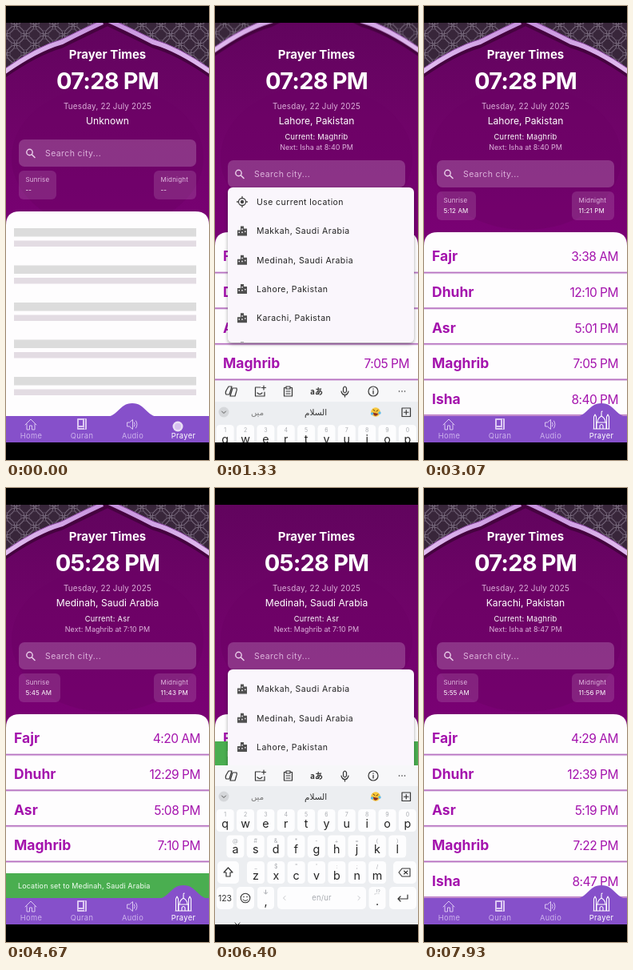
An HTML page for the animation above (8 s loop, 254x568 px).

```html
<!DOCTYPE html>
<html lang="en">
<head>
<meta charset="utf-8">
<title>Prayer Times</title>
<style>
html, body { margin: 0; width: 100%; height: 100%; overflow: hidden; background: #000; }
svg { display: block; width: 100%; height: 100%; }
text { font-family: Poppins, Inter, sans-serif; white-space: pre; }
.mid { text-anchor: middle; }
.end { text-anchor: end; }
.bold { font-weight: 700; }
.arab { font-family: "Noto Sans", "DejaVu Sans", sans-serif; }
.cjk { font-family: "Noto Sans CJK JP", "Noto Sans CJK", sans-serif; font-weight: 700; }
.line { fill: none; stroke-linecap: round; stroke-linejoin: round; }
</style>
</head>
<body>
<svg id="stage" viewBox="0 0 254 568"></svg>
<script>
const LOOP = 8000;
const text = (x, y, size, fill, str, cls = '', gap = 0) =>
  `<text x="${x}" y="${y}" font-size="${size}" fill="${fill}" class="${cls}" letter-spacing="${gap}">${str}</text>`;
const rect = (x, y, w, h, fill, r = 0) =>
  `<rect x="${x}" y="${y}" width="${w}" height="${h}" rx="${r}" fill="${fill}"/>`;
const line = (d, color, width = 1) =>
  `<path class="line" d="${d}" stroke="${color}" stroke-width="${width}"/>`;
const group = (id, body, attrs = '') => `<g id="${id}" ${attrs}>${body}</g>`;
const move = (x, y, body) => `<g transform="translate(${x} ${y})">${body}</g>`;
const ring = (x, y, r, color, width = 1) =>
  `<circle cx="${x}" cy="${y}" r="${r}" fill="none" stroke="${color}" stroke-width="${width}"/>`;
const dot = (x, y, r, fill) => `<circle cx="${x}" cy="${y}" r="${r}" fill="${fill}"/>`;

const PRAYERS = ['Fajr', 'Dhuhr', 'Asr', 'Maghrib', 'Isha'];
const PLACES = {
  lahore: {
    clock: '07:28 PM', city: 'Lahore, Pakistan', now: 'Maghrib', next: 'Isha at 8:40 PM',
    sunrise: '5:12 AM', midnight: '11:21 PM', boxWidth: 49,
    times: ['3:38 AM', '12:10 PM', '5:01 PM', '7:05 PM', '8:40 PM']
  },
  medinah: {
    clock: '05:28 PM', city: 'Medinah, Saudi Arabia', now: 'Asr', next: 'Maghrib at 7:10 PM',
    sunrise: '5:45 AM', midnight: '11:43 PM', boxWidth: 52,
    times: ['4:20 AM', '12:29 PM', '5:08 PM', '7:10 PM', '8:40 PM']
  },
  karachi: {
    clock: '07:28 PM', city: 'Karachi, Pakistan', now: 'Maghrib', next: 'Isha at 8:47 PM',
    sunrise: '5:55 AM', midnight: '11:56 PM', boxWidth: 52,
    times: ['4:29 AM', '12:39 PM', '5:19 PM', '7:22 PM', '8:47 PM']
  }
};

const defs = `<defs>
  <linearGradient id="wall" x1="0" y1="0" x2="0" y2="1">
    <stop offset="0" stop-color="#5f045c"/><stop offset=".45" stop-color="#6f0368"/><stop offset="1" stop-color="#7d0078"/>
  </linearGradient>
  <linearGradient id="band" x1="0" y1="0" x2="1" y2="0">
    <stop offset="0" stop-color="#e2bdf0"/><stop offset="1" stop-color="#c48fdc"/>
  </linearGradient>
  <pattern id="lattice" width="24" height="24" patternUnits="userSpaceOnUse">
    ${rect(0, 0, 24, 24, '#38263a')}
    ${[[0, 0], [24, 0], [0, 24], [24, 24], [12, 12]].map(([x, y]) =>
      ring(x, y, 11, '#85778a', .8) + ring(x, y, 7, '#66566b', .7)).join('')}
  </pattern>
  <clipPath id="menuClip"><rect x="16" y="227" width="233" height="194" rx="6"/></clipPath>
  <filter id="soft" x="-10%" y="-10%" width="120%" height="125%">
    <feDropShadow dx="0" dy="2" stdDeviation="2" flood-opacity=".35"/>
  </filter>
</defs>`;

const archHalf = `
  <path d="M0 0H127V19Q101 31 70 46Q38 55 0 82Z" fill="url(#lattice)"/>
  ${line('M130 21Q101 35 70 50Q38 59 -3 88', '#45033f', 5)}
  ${line('M130 16Q101 29 70 45Q38 54 -3 83', 'url(#band)', 6)}
  ${line('M130 13Q101 26 70 41.500Q38 50.500 -3 79.500', '#8c46a3', 1)}`;
const arch = archHalf + `<g transform="matrix(-1 0 0 1 254 0)">${archHalf}</g>`;

function infoBoxes(width, sunrise, midnight) {
  const box = (x, w, label, value) => rect(x, 232, w, 36, '#fff2', 6) +
    text(x + 8.5, 246, 8, '#e0b9df', label, '', .2) + text(x + 8.5, 259, 8, '#fff', value, '', .1);
  return box(16, width, 'Sunrise', sunrise) + box(185, 53, 'Midnight', midnight);
}

const place = (id, p) => group(id,
  text(127, 104, 29, '#fff', p.clock, 'mid bold', -.8) +
  text(127, 147.500, 12.1, '#fff', p.city, 'mid') +
  text(127, 167, 9.3, '#fff', 'Current: ' + p.now, 'mid', .25) +
  text(127, 180, 9, '#dfb5dd', 'Next: ' + p.next, 'mid') +
  infoBoxes(p.boxWidth, p.sunrise, p.midnight) +
  PRAYERS.map((name, i) => {
    const y = 319.300 + i * 44.600;
    return text(10, y, 17.500, '#a413ad', name, 'bold') +
      text(243, y, 15.500, '#a413ad', p.times[i], 'end', -.5) +
      rect(0, y + 13, 254, 3, '#e6d3ea') + rect(0, y + 13.500, 254, 1.500, '#b873c2');
  }).join(''));

const skeleton = group('loading',
  text(127, 104, 29, '#fff', '07:28 PM', 'mid bold', -.8) +
  text(127, 147.500, 12.1, '#fff', 'Unknown', 'mid') +
  move(0, -26, infoBoxes(47, '--', '--')) +
  [0, 1, 2, 3, 4].map(i => rect(10, 278 + i * 46.500, 228, 10.500, '#dcdcdc') +
    rect(10, 293.500 + i * 46.500, 228, 7.500, '#e3dce3')).join(''));

const search = rect(16, 193, 222, 34, '#fff3', 7) + ring(29.500, 209, 3.700, '#ead0ea', 1.400) +
  line('M32.500 212L36 215.500', '#ead0ea', 1.600) +
  text(49, 214.300, 10.500, '#dcb2db', 'Search city...', '', .4);

const targetIcon = ring(34, 245, 4.500, '#444', 1.300) + dot(34, 245, 2.200, '#444') +
  line('M34 238.500V240M34 250V251.500M27.500 245H29M39 245H40.500', '#444', 1.300);
const cityIcon = `<path fill="#505050" fill-rule="evenodd" d="M28 -1H32V-6H36V-3H40V6H28Z
  M29.500 1V2.500H31V1ZM33.200 -3V-1.500H34.800V-3ZM33.200 1V2.500H34.800V1ZM37 0V1.500H38.500V0Z"/>`;
const cities = ['Makkah, Saudi Arabia', 'Medinah, Saudi Arabia', 'Lahore, Pakistan',
  'Karachi, Pakistan', 'Islamabad, Pakistan'];
const menu = group('menu',
  `<g filter="url(#soft)">${rect(16, 227, 233, 194, '#faf6fc', 6)}</g>
  <g clip-path="url(#menuClip)">${group('menuRows', targetIcon +
    text(52, 249, 10.500, '#222', 'Use current location', '', .42) +
    cities.map((name, i) => move(0, 281.500 + i * 36.250, cityIcon +
      text(52, 3.800, 10.500, '#222', name, '', .45))).join(''))}</g>`);

const snack = group('snack', rect(0, 482, 254, 31, '#4aae50') +
  text(15, 501, 9, '#f4fff4', 'Location set to Medinah, Saudi Arabia', '', .12));

const pale = '#dcc8f2';
const homeIcon = line('M24 524L31 517L38 524M26 523V530H29.500V525H32.500V530H36V523', pale);
const bookIcon = rect(89, 516, 12, 14, pale, 1) + rect(91, 518, 5, 7, '#8650ca') +
  line('M98.500 517V529M91 527.500H97', '#8650ca');
const audioIcon = line('M152 521H154.500L158.500 517.500V529.500L154.500 526H152ZM160.500 521Q162 523.500 160.500 526M162.500 519Q165.500 523.500 162.500 528', pale);
const mosque = line(`M212 529H232M216 529V521H228V529M217 521Q217 516 222 513Q227 516 227 521M222 513V509
  M212.500 529V514L214 511L215.500 514V529M228.500 529V514L230 511L231.500 514V529M220 529V525Q222 522 224 525V529
  M222 508L223 507`, '#fff', 1.100);
const nav = rect(0, 513, 254, 34, '#8650ca') +
  group('bump', '<path d="M-34 514C-17 514 -17 497 0 497S17 514 34 514Z" fill="#8650ca"/>') +
  homeIcon + bookIcon + audioIcon + group('mosque', mosque) +
  group('touch', dot(215, 526, 6.500, '#e9dff5') + dot(215, 526, 4, '#d6c0ee')) +
  ['Home', 'Quran', 'Audio', 'Prayer'].map((name, i) =>
    text(31.500 + i * 63.500, 541, 9.300, i === 3 ? '#fff' : '#cdb2ed', name, 'mid', .35)).join('');

function keyboard() {
  const ink = '#333', faint = '#a8abb0';
  const key = (cx, y, w, label, hint = '') => rect(cx - w / 2, y, w, 28, '#fdfdfe', 4.500) +
    text(cx, y + 22.500, 14.300, '#222', label, 'mid') + text(cx, y + 9, 7, faint, hint, 'mid');
  const row = (letters, hints, x, y) =>
    [...letters].map((c, i) => key(x + i * 25.350, y, 22, c, hints[i])).join('');
  const toolbar =
    line('M17 354H21L18 364H14Q12.500 362 14 359ZM23 356H27Q28 358 26.500 361L25 366H19L22 356', ink, 1.200) +
    line('M57 355H50.500V366H62V361M53 362Q56 365 59 362M61 353V358M58.500 355.500H63.500', ink, 1.200) +
    line('M88 355.500H86.500V366H96.500V355.500H95M89 354H94V357H89ZM89 360H94M89 363H94', ink, 1.200) +
    text(127, 364, 10, ink, 'aあ', 'mid cjk') +
    line('M160.500 356Q162.500 352 164.500 356V360Q162.500 364 160.500 360ZM158 360Q159 364.500 162.500 364.500Q166 364.500 167 360M162.500 364.500V367', ink, 1.200) +
    ring(198, 360, 6, ink, 1.200) + line('M198 359.500V363M198 357V357.200', ink, 1.300) +
    [230.500, 234, 237.500].map(x => dot(x, 360, .8, ink)).join('');
  const strip = dot(11, 386, 6.500, '#d5d7da') + line('M8.500 385L11 387.500L13.500 385', '#555') +
    text(53, 390, 10, '#777', 'میں', 'mid arab') + text(126, 390, 10.500, ink, 'السلام', 'mid arab') +
    dot(201, 386, 5.800, '#f8c83b') + line('M198 383L200 384.500M204 383.500L202 385', '#643b12') +
    '<path d="M197.500 386.500L204.500 388Q202 392 199 390Z" fill="#8c2f22"/>' +
    dot(196.500, 388, 1.700, '#58b9ec') + dot(206, 387, 1.700, '#58b9ec') +
    line('M234 381H244.500V391.500H234ZM239.250 383.500V389M236.500 386.250H242', ink, 1.200);
  const shift = rect(3, 467, 27, 28, '#fdfdfe', 5) + line('M16.500 475L22 481H19V486H14V481H11Z', ink, 1.200);
  const erase = rect(223, 467, 29, 28, '#fdfdfe', 5) +
    line('M230 481L234 476H244V486H234ZM236.500 479L241 483M241 479L236.500 483', ink, 1.100);
  const bottom = rect(2, 499, 21, 28, '#fdfdfe', 5) + text(12.500, 517, 10.500, ink, '123', 'mid') +
    rect(27, 499, 22, 28, '#fdfdfe', 5) + ring(38, 513, 5.800, ink, 1.100) + dot(36, 511.500, .8, ink) +
    dot(40, 511.500, .8, ink) + line('M35 515Q38 518 41 515', ink) +
    key(63.500, 499, 21, ',') + line('M63.500 503V507M61.500 506Q63.500 510 65.500 506', faint) +
    rect(78, 499, 111, 28, '#fdfdfe', 5) + text(133.500, 516, 9.300, faint, 'en/ur', 'mid', .2) +
    line('M88 510.500L85.500 513L88 515.500M179 510.500L181.500 513L179 515.500', '#c6c8cb') +
    key(203, 499, 21, '.', ',!?') + rect(218, 499, 34, 28, '#fdfdfe', 5) +
    line('M241 509V514H229M232 511L229 514L232 517', ink, 1.200);
  return rect(0, 347, 254, 201, '#eceef1') + rect(0, 347, 254, 26, '#f7f7f9') + toolbar + strip +
    row('qwertyuiop', '1234567890', 12.700, 402) + row('asdfghjkl', '@#&amp;*-+=()'.replace('&amp;', '&'), 25.400, 434.500) +
    row('zxcvbnm', '_$"\':;/', 51, 467) + shift + erase + bottom + line('M25 544L28 547L31 544', ink);
}

const glow = '<ellipse cx="127" cy="190" rx="120" ry="90" fill="#6a0064" opacity=".45"/>';
document.getElementById('stage').innerHTML = defs +
  rect(0, 0, 254, 330, 'url(#wall)') + glow + group('arch', arch) +
  text(127, 65.500, 15, '#fff', 'Prayer Times', 'mid bold') +
  text(127, 129, 9.900, '#dcb0da', 'Tuesday, 22 July 2025', 'mid', .2) +
  group('panel', search + '<path d="M0 300Q0 283 17 283H237Q254 283 254 300V600H0Z" fill="#fefdfe"/>') +
  skeleton + Object.entries(PLACES).map(([id, p]) => place(id, p)).join('') +
  snack + nav + menu + group('keys', keyboard()) +
  rect(0, 0, 254, 21, '#000') + rect(0, 546, 254, 22, '#000');

// Rows are [ms, value, easing until the next row].
function play(id, prop, rows, value) {
  const last = rows[rows.length - 1];
  const frames = [...rows, [LOOP, last[1]]].map(([t, v, easing = 'linear']) =>
    ({ offset: t / LOOP, [prop]: value(v), easing }));
  document.getElementById(id).animate(frames, { duration: LOOP, iterations: Infinity });
}
const slide = (id, rows, x = 0) => play(id, 'transform', rows, v => `translate(${x}px, ${v}px)`);
const fade = (id, rows) => play(id, 'opacity', rows, v => v);
const show = (id, ...spans) => fade(id, [[0, spans[0][0] === 0 ? 1 : 0, 'steps(1,end)'],
  ...spans.flatMap(([from, to]) => [[from, 1, 'steps(1,end)'], [to, 0, 'steps(1,end)']])
    .filter(([t]) => t > 0 && t < LOOP)]);

const LOADED = 520, TO_MEDINAH = 3250, TO_KARACHI = 7760;
show('loading', [0, LOADED]);
show('lahore', [LOADED, TO_MEDINAH]);
show('medinah', [TO_MEDINAH, TO_KARACHI]);
show('karachi', [TO_KARACHI, LOOP]);
slide('panel', [[0, -26, 'steps(1,end)'], [LOADED, 0]]);

play('bump', 'transform', [[0, 158, 'ease-in-out'], [380, 222]], v => `translate(${v}px, 0px)`);
fade('touch', [[0, 1], [70, 1, 'ease-out'], [260, 0]]);
fade('mosque', [[0, 0], [120, 0, 'ease-out'], [380, 1]]);

// Keyboard openness drives everything that moves with the shrinking page.
const OPEN = [[0, 0], [1250, 0], [1330, .385, 'ease-out'], [1560, 1], [2700, 1, 'ease-in-out'], [2960, 0],
  [5290, 0], [5370, .385, 'ease-out'], [5600, 1], [7440, 1, 'ease-in-out'], [7700, 0]];
const follow = (from, to, rows = OPEN) => rows.map(([t, k, e]) => [t, from + (to - from) * k, e]);
slide('keys', follow(200, 0));
slide('arch', follow(0, -68));
slide('snack', [[0, 36], [3560, 36, 'ease-out'], [3800, 0], ...follow(0, -165, OPEN.slice(6)), [7730, 36]]);
show('snack', [3560, 7730]);

show('menu', [1200, 2690], [5260, 7440]);
slide('menuRows', [[0, 0], [6180, 0, 'ease-in-out'], [6600, -55, 'ease-out'], [7020, -92], [7200, -93],
  [7500, -93, 'steps(1,end)'], [7510, 0]]);
</script>
</body>
</html>
```
